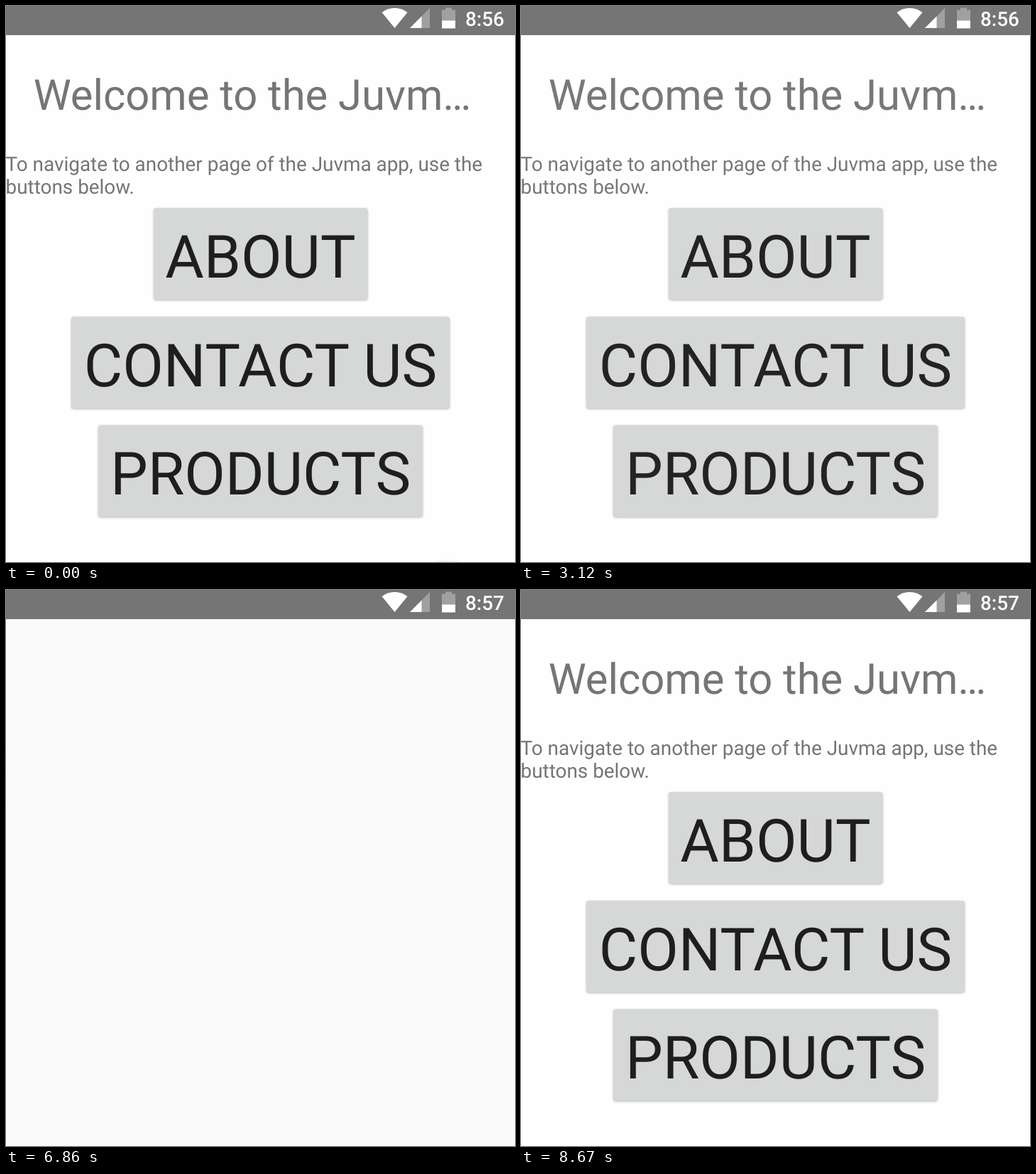
An HTML page that plays this animation: 717x782 px, repeating every 9.51 s.

```html
<!DOCTYPE html>
<html lang="en">
<head>
<meta charset="utf-8">
<title>App navigation</title>
<style>
  html, body { margin: 0; width: 100%; height: 100%; overflow: hidden; background: #fafafa; }
  svg { display: block; width: 717px; height: 782px; }
  text {
    font-family: Roboto, "Liberation Sans", sans-serif;
    font-size: 27.9px;
    fill: #757575;
    text-rendering: geometricPrecision;
  }
  .title { font-size: 59.75px; }
  .mid { text-anchor: middle; }
  .bg { fill: #fefefe; }
  .btn rect { fill: #d6d8d7; filter: drop-shadow(0 1.5px 1.5px rgba(0, 0, 0, .28)); }
  .btn text { font-size: 83.65px; fill: #1e1e1e; text-anchor: middle; }
  .clock { font-weight: 500; fill: #fff; }

  .page, .clock, .ripple, #press { animation: 9510ms step-end infinite; }
  .page { opacity: 0; }
  #home { animation-name: home; }
  #about { animation-name: about; }
  #contact { animation-name: contact; }
  #products { animation-name: products; }
  #early { animation-name: early; }
  #late { animation-name: late; }
  .ripple { animation-name: ripple; }
  .btn #press { animation-name: press; }

  @keyframes home {
    0% { opacity: 1 }
    11.25% { opacity: .95 } 12.09% { opacity: .75 } 12.93% { opacity: .4 }
    13.77% { opacity: .1 } 14.61% { opacity: 0 }
    30.91% { opacity: .2 } 31.86% { opacity: .65 } 32.8% { opacity: .98 }
    41.64% { opacity: .8 } 42.48% { opacity: .4 } 43.32% { opacity: .1 } 44.16% { opacity: 0 }
    59.62% { opacity: .18 } 60.43% { opacity: .55 } 61.23% { opacity: .85 } 62.03% { opacity: 1 }
    69.61% { opacity: .8 } 70.45% { opacity: .4 } 71.29% { opacity: .1 } 72.13% { opacity: 0 }
    88.53% { opacity: .2 } 89.38% { opacity: .55 } 90.32% { opacity: .85 }
    91.16%, 100% { opacity: 1 }
  }
  @keyframes about {
    0% { opacity: 0 }
    14.61% { opacity: .15 } 15.45% { opacity: .6 } 16.19% { opacity: 1 }
    29.33%, 100% { opacity: 0 }
  }
  @keyframes contact {
    0% { opacity: 0 }
    44.16% { opacity: .1 } 45% { opacity: .55 } 45.84% { opacity: 1 }
    59.62%, 100% { opacity: 0 }
  }
  @keyframes products {
    0% { opacity: 0 }
    72.13% { opacity: .01 } 72.97% { opacity: .5 } 73.71% { opacity: .96 } 75.49% { opacity: 1 }
    87.69%, 100% { opacity: 0 }
  }
  @keyframes early { 0% { opacity: 1 } 56.25%, 100% { opacity: 0 } }
  @keyframes late { 0% { opacity: 0 } 56.25%, 100% { opacity: 1 } }
  @keyframes ripple { 0% { opacity: 1 } 11.25%, 100% { opacity: 0 } }
  @keyframes press {
    0% { filter: drop-shadow(0 1.5px 1.5px rgba(0, 0, 0, .28)) }
    40.06% { filter: drop-shadow(0 4px 3px rgba(0, 0, 0, .3)) }
    44.16%, 100% { filter: drop-shadow(0 1.5px 1.5px rgba(0, 0, 0, .28)) }
  }
</style>
</head>
<body>
<svg viewBox="0 0 717 782">
  <rect width="717" height="782" fill="#fafafa"/>

  <g id="about" class="page">
    <rect class="bg" width="717" height="782"/>
    <text class="title mid" x="358.5" y="146">About Juvma</text>
    <g class="copy"></g>
    <rect x="711" y="41" width="6" height="697" fill="#b4b4b4"/>
  </g>

  <g id="contact" class="page">
    <rect class="bg" width="717" height="782"/>
    <text class="title mid" x="358.5" y="146">Contact Juvma</text>
    <g class="copy"></g>
  </g>

  <g id="products" class="page">
    <rect class="bg" width="717" height="782"/>
    <text class="title mid" x="358.5" y="146">Juvma Products</text>
    <g class="copy"></g>
  </g>

  <g id="home" class="page">
    <rect class="bg" width="717" height="782"/>
    <text class="title" x="38.7" y="146">Welcome to the Juvm…</text>
    <g class="copy"></g>
    <g class="btn">
      <rect x="208" y="284" width="301.5" height="129" rx="4"/>
      <text x="358.5" y="381.7">ABOUT</text>
      <rect id="press" x="92" y="437" width="533" height="129" rx="4"/>
      <text x="358.5" y="534.5">CONTACT US</text>
      <rect x="130" y="589.5" width="457" height="129" rx="4"/>
      <text x="358.5" y="687.2">PRODUCTS</text>
    </g>
    <circle class="ripple" cx="622" cy="847" r="68" fill="#f3f3f3"/>
  </g>

  <g id="status">
    <rect width="717" height="41" fill="#757575"/>
    <path d="M529.5 9Q547.5-3.5 565.5 9L547.5 31Z" fill="#fff"/>
    <path d="M569 31L597 3V31Z" fill="#a0a0a0"/>
    <path d="M569 31L585.5 14.5V31Z" fill="#fff"/>
    <path d="M614 5.5H619V2.5H628V5.5H633V21H614Z" fill="#a0a0a0"/>
    <path d="M614 20.5H633V31.5H614Z" fill="#fff"/>
    <text id="early" class="clock" x="647" y="28">8:56</text>
    <text id="late" class="clock" x="647" y="28">8:57</text>
  </g>
</svg>
<script>
  const LINE = 32.7, GAP = 38;

  // Each page is a list of paragraphs; "\n" marks a line break.
  const copy = {
    home: ["To navigate to another page of the Juvma app, use the\nbuttons below."],
    about: [
      "Juvma is a small online retailer specializing in retro video\ngames sales and services. We're based in Lousiville, KY.",
      "Our Mission",
      "We exist to bring our customers the best in retro gaming\nat an affordable price. We love to revisit and replay the\ngames that shaped our childhoods, and believe that\nthrough sharing our love, we can help shape another\ngeneration of retro gaming geeks.",
      "History",
      "In the early 90's, it all started with Garden Imps. This\nmulti-player vintage platformer brought the Gumda-style\nside-scrolling gun fights to life in our living room. True, it\nwas impossible to beat with the 3 lives you got by default,\nbut that's why everyone knew the 50 lives code by heart:\nup, up, down, down, left, right, left, right, B, A, Start. And if\nyou wanted a friend to play along, you could throw in the\nSelect, Start at the end."
    ],
    contact: ["To ask about our games and services, send us a\nmessage."],
    products: ["Retro video games", "Consoles", "Controllers"]
  };

  for (const [id, paragraphs] of Object.entries(copy)) {
    const box = document.querySelector(`#${id} .copy`);
    let y = 231.7;
    for (const paragraph of paragraphs) {
      const lines = paragraph.split("\n");
      lines.forEach((line, i) => {
        const text = document.createElementNS(box.namespaceURI, "text");
        text.setAttribute("x", -0.5);
        text.setAttribute("y", y + i * LINE);
        text.textContent = line;
        box.append(text);
      });
      y += (lines.length - 1) * LINE + GAP;
    }
  }
</script>
</body>
</html>
```
